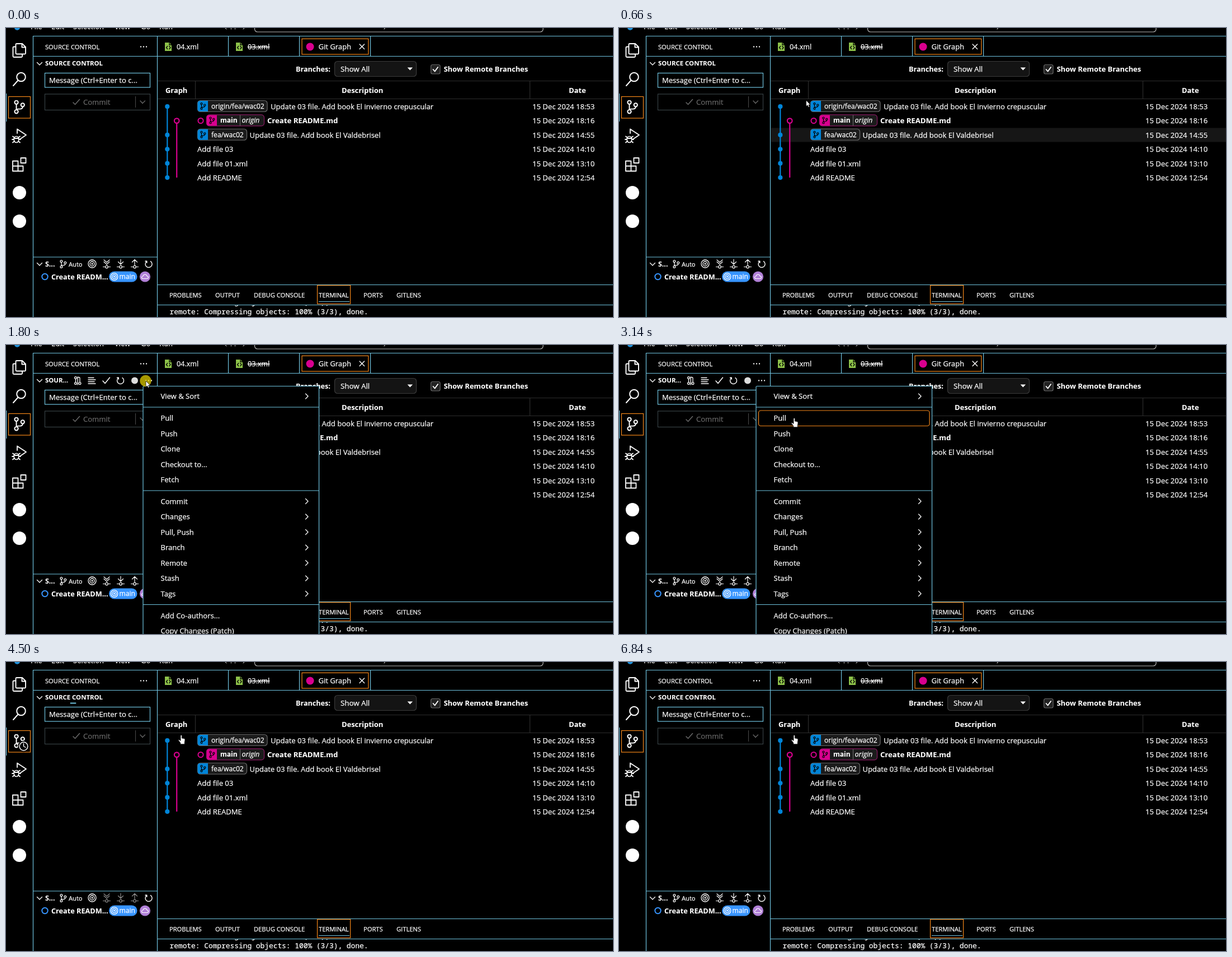
These frames come from a looping animation (1085x516 px, 8000 ms). An HTML page:

```html
<!DOCTYPE html>
<html lang="en">
<head>
<meta charset="utf-8">
<title>Pull from the source control menu</title>
<style>
html, body { margin: 0; width: 100%; height: 100%; overflow: hidden; background: #000; }
svg { display: block; font: 13.05px "Open Sans", "Noto Sans", sans-serif; }
text { fill: #fff; stroke: #fff; stroke-width: .25; white-space: pre; }
.b { font-weight: 700; font-size: 12.9px; }
.s { font-size: 11.15px; }
.h { font-weight: 700; font-size: 11.4px; }
.r { font-size: 12.1px; }
.m { font: 500 12.86px "Noto Sans Mono", "DejaVu Sans Mono", monospace; }
.b, .h { stroke-width: .1; }
.i { fill: none; stroke: #fff; stroke-linecap: round; stroke-linejoin: round; }
</style>
</head>
<body>
<svg id="stage" width="1085" height="516" viewBox="0 0 1085 516"></svg>
<script>
const CYAN = '#6fc3df', ORANGE = '#f38518', BLUE = '#0085d9', PINK = '#d9008f';
const PERIOD = 8000, TICK = 67.9;

const text = (x, y, s, cls = '', more = '') => `<text x="${x}" y="${y}" class="${cls}" ${more}>${s}</text>`;
const path = (d, w = 1.3, more = '') => `<path class="i" d="${d}" stroke-width="${w}" ${more}/>`;
const line = (d, c = CYAN, w = 1.2) => `<path d="${d}" fill="none" stroke="${c}" stroke-width="${w}"/>`;
const rect = (x, y, w, h, c = CYAN, fill = 'none', r = 0, more = '') =>
  `<rect x="${x}" y="${y}" width="${w}" height="${h}" rx="${r}" fill="${fill}" stroke="${c}" stroke-width="1.2" ${more}/>`;
const disc = (x, y, r, c) => `<circle cx="${x}" cy="${y}" r="${r}" fill="${c}"/>`;
const ring = (x, y, r, c = '#fff', w = 1.3, fill = 'none') =>
  `<circle cx="${x}" cy="${y}" r="${r}" fill="${fill}" stroke="${c}" stroke-width="${w}"/>`;
const group = (id, s, more = '') => `<g id="${id}" ${more}>${s}</g>`;
const at = (x, y, s, k = 1) => `<g transform="translate(${x} ${y}) scale(${k})">${s}</g>`;

const branch = (x, y, k = 1, c = '#fff', w = 1.3) => at(x, y,
  ring(-3, -5, 1.9, c, w) + ring(-3, 5, 1.9, c, w) + ring(3.8, -2.2, 1.9, c, w) +
  `<path d="M-3-3V3M3.8-.3Q3.8 2.2 1 2.2H-1Q-3 2.2-3 3.6" fill="none" stroke="${c}" stroke-width="${w}"/>`, k);
const dots = (x, y) => [-5, 0, 5].map(d => disc(x + d, y, 1.15, '#fff')).join('');
const target = (x, y, k = 1) => ring(x, y, 7 * k) + ring(x, y, 4 * k) + disc(x, y, 1.6 * k, '#fff');
const refresh = (x, y) => at(x, y, path('M-3.8-4.6A6 6 0 1 0 3.5-4.9M-6-5.2H-3.2V-2.2', 1.4));
// a commit on a line, below an arrow
const commitArrow = (x, d) => at(x, 421, path('M-6.5 5.5H-2.4M2.4 5.5H6.5' + d, 1.2) + ring(0, 5.5, 2.3, '#fff', 1.2));

function chrome() {
  const menuBar = [['File', 44], ['Edit', 81], ['Selection', 120], ['View', 194], ['Go', 241], ['Run', 274]];
  return disc(20, -1, 5, '#1f8fd8') + menuBar.map(([s, x]) => text(x, 1.5, s)).join('') +
    path('M392 0L394 2M426 0L424 2M402 1.5h1M409 1.5h1', 1) +
    rect(444.5, -20, 515.5, 27, '#b8b8b8', 'none', 5) + path('M676 2L678-1', 1) +
    line('M48 14.5H1085M48.5 14V516M270.5 14V516M49 50.5H1085M397.5 14V51M524.5 14V51M651.5 14V51') +
    line('M49 409H270M271 458.5H1085M271 494.5H1085');
}

function activityBar() {
  const files = 'M19 28H29L35 34V45Q35 46.5 33.5 46.5H19Q17.5 46.5 17.5 45V29.5Q17.5 28 19 28ZM28.5 28V34.5H35' +
    'M17 33.5H14Q12.5 33.5 12.5 35V50.5Q12.5 52 14 52H27.5Q29 52 29 50.5V47';
  const bug = 'M20 188V180.5L36 191L25 198.5M12 193.5L15 195.5M25 193.5L22 195.5M11 199H14M26 199H23' +
    'M12 204.5L15 202M25 204.5L22 202M14.3 197H22.7';
  return path(files, 1.9) + ring(27, 87.5, 7.8, '#fff', 2) + path('M21.5 93.5L13 103', 2) +
    rect(4.5, 122.5, 39, 38.5, ORANGE) + line('M.5 117V167') + branch(23.5, 141, 1.65, '#fff', 1.2) +
    path(bug, 1.8) + `<ellipse cx="18.5" cy="199" rx="4.3" ry="5.5" fill="none" stroke="#fff" stroke-width="1.7"/>` +
    path('M12 237.5H21.5V246.5H30.5V255.5H12ZM12 246.5H21.5V255.5M26.5 232H35.5V241H26.5Z', 1.8) +
    disc(24, 294, 12, '#fff') + disc(24, 345, 12, '#fff');
}

function sideBar() {
  const plain = text(70, 67.3, 'SOURCE CONTROL', 'h');
  const tools = text(70, 67.3, 'SOUR...', 'h') +
    ring(124.5, 58.5, 1.9) + ring(124.5, 68.5, 1.9) + ring(132, 68.5, 1.9) +
    path('M124.5 60.5V66.5M132 66.5V59Q132 57.5 129 57.5M128.2 57V71') +
    path('M147 58.5H157M147 62H160M147 65.5H158M147 69H160') +
    path('M173 64L177 68.5L185.5 58', 1.5) + refresh(204.5, 63.5) + disc(230, 63.5, 6, '#ddd') + dots(255, 63.5);
  const commit = rect(69.5, 118, 188, 28.5, '#8aa3ad', 'none') + line('M231.5 122V142', '#aaa') +
    path('M120 133L123.5 136.5L131.5 127.5', 1.6) + text(138, 137, 'Commit') + path('M240 130L244 134.5L248.5 130', 1.3);
  const sync = commitArrow(180, 'M-5-7L0-2.5L5-7M-5-3.5L0 1L5-3.5') +
    commitArrow(205, 'M0-8V1M-4.5-3.5L0 1L4.5-3.5') + commitArrow(230, 'M0 2V-7.5M-4.5-3L0-7.5L4.5-3');
  return text(70, 37.8, 'SOURCE CONTROL', 's') + dots(246, 33.5) +
    path('M55.5 61.5L60 66L64.5 61.5') + group('plain', plain) + group('tools', tools) +
    rect(69.5, 80.5, 188, 25.5) + text(77, 98.3, 'Message (Ctrl+Enter to c...') + `<g opacity=".4">${commit}</g>` +
    path('M55.5 419.5L60 424L64.5 419.5') + text(70, 425.7, 'S...', 'h', 'style="font-size:12.4px"') +
    branch(102, 421.5) + text(112, 425.7, 'Auto', 's') + target(154, 421) + group('sync', sync) + refresh(255, 421.5) +
    ring(69.5, 444, 5.2, '#3794ff', 2) + text(81, 448.7, 'Create READM...', 'b', 'style="font-size:12.7px"') +
    rect(184, 434.5, 50.5, 19, 'none', '#3794ff', 9.5) + target(193.5, 444, .9) + text(202.5, 448.3, 'main', 'r') +
    disc(248.5, 444, 9.6, '#b180d7') +
    path('M244.5 447.5Q242.3 447 242.5 445Q242.8 443 245 443Q245.5 440 248.5 440Q251.5 440 252 443Q254.5 443 254.5 445.3Q254.3 447.5 252 447.5Z', 1.2) +
    group('bar', rect(0, 72.5, 10.5, 2, 'none', CYAN)) +
    group('clock', disc(31.5, 150.5, 10, '#000') + ring(31.5, 150.5, 7.4, '#fff', 1.5) + path('M31.5 145.5V150.5L35 152.5', 1.4));
}

function tabs() {
  const file = x => at(x, 33.5,
    '<path d="M-6-7.5H2L6-3.5V7.5H-6Z" fill="#8dc149"/><path d="M-1-1.5L-3.5 1.5L-1 4.5M1.5-1.5L4 1.5L1.5 4.5M2-7V-3.5H6" fill="none" stroke="#000" stroke-width="1.3"/>');
  return file(290) + text(305, 38.3, '04.xml', '', 'font-size="12.6"') +
    file(417) + text(432, 38.3, '03.xml', '', 'font-size="12.6" text-decoration="line-through"') +
    rect(529, 19.3, 118.7, 27.7, ORANGE) + disc(543.5, 33.5, 7, PINK) + text(558.5, 38.3, 'Git Graph') +
    path('M632 29L640.5 37.5M640.5 29L632 37.5', 1.4);
}

function graph() {
  const rowY = i => 140.2 + i * 25.38;
  const rows = [
    [473, 'Update 03 file. Add book El invierno crepuscular', '18:53'],
    [467, 'Create README.md', '18:16'],
    [435.5, 'Update 03 file. Add book El Valdebrisel', '14:55'],
    [342, 'Add file 03', '14:10'],
    [342, 'Add file 01.xml', '13:10'],
    [342, 'Add README', '12:54']
  ];
  const label = (x, y, w, c, edge = '#6a6a6a') => rect(x + .5, y - 10, w, 20, edge, '#1b1b1b', 5) +
    `<path d="M${x + 19} ${y - 9.5}H${x + 5}Q${x + .5} ${y - 9.5} ${x + .5} ${y - 5}V${y + 5}Q${x + .5} ${y + 9.5} ${x + 5} ${y + 9.5}H${x + 19}Z" fill="${c}"/>` +
    branch(x + 10, y, .85, '#000', 1.4);
  let s = text(518, 78, 'Branches:', 'b', 'style="font-size:12.6px"') + rect(587.5, 59.5, 146, 27, '#3a3a3a', '#141414', 5) +
    text(598, 78, 'Show All', '', 'font-size="13.3"') + '<path d="M717.5 70.5H727L722.2 75.5Z" fill="#fff"/>' +
    rect(759.5, 65.5, 16.5, 16.5, '#666', '#222', 3) + path('M763.5 74L766.5 77.5L772 70', 1.9) +
    text(782.5, 78, 'Show Remote Branches', 'b') +
    line('M271 94.5H1085M271 126.5H1085M338.5 95V126M936.5 95V126', '#2c2c2c') +
    text(285, 115.5, 'Graph', 'b') + text(600, 115.5, 'Description', 'b') + text(1006, 115.5, 'Date', 'b') +
    group('hover', rect(271, rowY(2) - 12.5, 814, 25, 'none', '#161616'));
  s += line(`M288.3 ${rowY(0)}V${rowY(5)}`, BLUE, 2.2) + line(`M305.2 ${rowY(1)}V${rowY(5)}`, PINK, 2.2);
  rows.forEach(([x, msg, time], i) => {
    const y = rowY(i);
    s += i === 1 ? ring(305.2, y, 4.3, PINK, 2.2, '#000') : disc(288.3, y, 4.1, BLUE);
    s += text(x, y + 4.8, msg, i === 1 ? 'b' : '', i === 1 ? 'style="font-size:13.15px"' : '') +
      text(941, y + 4.8, '15 Dec 2024 ' + time);
  });
  return s + label(342, rowY(0) - .7, 124.5, BLUE) + text(367, rowY(0) + 3.8, 'origin/fea/wac02', 'r') +
    ring(348, rowY(1), 4.6, PINK, 2) + label(358, rowY(1) - .7, 103, PINK, '#8a1a63') +
    text(383, rowY(1) + 3.8, 'main', 'b', 'style="font-size:12px"') + line('M418.5 155.5V174.5', '#666') +
    text(421.5, rowY(1) + 3.8, 'origin', 'r', 'font-style="italic" style="font-size:12.5px"') +
    label(342, rowY(2) - .7, 88, BLUE) + text(367, rowY(2) + 3.8, 'fea/wac02', 'r');
}

function panel() {
  const names = [['PROBLEMS', 292], ['OUTPUT', 374], ['DEBUG CONSOLE', 443], ['TERMINAL', 559], ['PORTS', 639], ['GITLENS', 698]];
  return names.map(([s, x]) => text(x, 480.7, s, 's')).join('') + rect(556.5, 459.5, 59, 33, ORANGE) +
    line('M559 488.5H614') + '<clipPath id="term"><path d="M272 495H1085V516H272Z"/></clipPath>' +
    `<g clip-path="url(#term)">${text(292.5, 494, 'remote: Counting objects: 100% (5/5), done.', 'm')}${
      text(292.5, 511.3, 'remote: Compressing objects: 100% (3/3), done.', 'm')}</g>`;
}

function menu() {
  // each block: top item centre, item names, whether they open a submenu
  const blocks = [
    [91.5, ['View &amp; Sort'], true],
    [130.5, ['Pull', 'Push', 'Clone', 'Checkout to...', 'Fetch'], false],
    [279, ['Commit', 'Changes', 'Pull, Push', 'Branch', 'Remote', 'Stash', 'Tags'], true],
    [483, ['Add Co-authors...', 'Copy Changes (Patch)'], false]
  ];
  let s = rect(245, 73.5, 314.5, 460, CYAN, '#000', 2) + line('M245 111H559M245 260H559M245 463.5H559');
  for (const [top, names, sub] of blocks) names.forEach((name, i) => {
    const y = top + i * 27.5;
    s += text(276.5, y + 4.7, name) + (sub ? path(`M535.5 ${y - 4.5}L540 ${y}L535.5 ${y + 4.5}`) : '');
  });
  const focus = (id, y) => group(id, rect(249.5, y - 13.5, 305.5, 27.5, ORANGE, 'none', 4));
  return s + focus('onSort', 91.5) + focus('onPull', 130.5);
}

const hot = (id, x) => group(id, rect(x - 10, 53.5, 20, 20, ORANGE, 'none', 4, 'stroke-dasharray="2 2"'));
const arrow = '<path d="M0 0V11L2.5 8.7L4.2 12.4L6 11.6L4.4 8H7.6Z" fill="#fff" stroke="#000" stroke-width=".7"/>';
const hand = '<path d="M-1 .5Q.2-.6 1.4.5V5.5L5.5 6.3Q7.2 6.7 7 8.5L6.2 13.5V16.2H-1.2V14L-4.6 9.6Q-5 8.3-3.8 8L-1 10Z" fill="#fff" stroke="#000" stroke-width=".7"/>';

document.getElementById('stage').innerHTML =
  '<rect width="1085" height="516"/>' + chrome() + activityBar() + sideBar() + tabs() + graph() + panel() +
  hot('hotGraph', 230.5) + hot('hotMore', 255.5) + group('menu', menu()) +
  group('halo', disc(0, 0, 10.3, '#e6d200'), 'opacity=".72"') + group('arrow', arrow) + group('hand', hand);

const el = id => document.getElementById(id);
// when each part is visible, in ms
const spans = {
  tools: [[870, 3275]],
  plain: [[0, 870], [3275, PERIOD]],
  hover: [[590, 730]],
  hotGraph: [[1060, 1280]],
  hotMore: [[1410, 1790]],
  menu: [[1790, 3275]],
  onSort: [[2460, 2590]],
  onPull: [[2590, 3275]],
  halo: [[1730, 1860], [3205, 3410]],
  bar: [[3275, 6765]],
  clock: [[3410, 6765]]
};
// pointer steps: time, x, y, shape
const moves = [
  [450, 556, 470, 'arrow'], [520, 557, 312, 'arrow'], [590, 425, 190, 'arrow'], [660, 334.5, 129, 'arrow'],
  [730, 299, 100, 'arrow'], [800, 274, 83, 'arrow'], [870, 257, 73, 'arrow'], [930, 247, 67, 'arrow'],
  [1000, 240, 63, 'arrow'], [1060, 236, 61, 'hand'], [1130, 235, 60, 'hand'], [1200, 236, 59.5, 'hand'],
  [1280, 241, 59, 'hand'], [1340, 243.5, 59, 'hand'], [1410, 247, 61, 'hand'], [1470, 249, 63, 'hand'],
  [1530, 250, 64, 'hand'], [1795, 250, 64, 'arrow'], [2390, 254, 69, 'arrow'], [2460, 265, 82, 'hand'],
  [2530, 282, 99, 'hand'], [2590, 296, 114, 'hand'], [2660, 304, 120, 'hand'], [2730, 307, 121, 'hand'],
  [2990, 309, 124, 'hand'], [3140, 313, 130.5, 'hand']
];

const show = (id, on) => { el(id).style.visibility = on ? 'inherit' : 'hidden'; };
const move = (id, x, y) => el(id).setAttribute('transform', `translate(${x} ${y})`);

function draw(t) {
  for (const id in spans) show(id, spans[id].some(([a, b]) => t >= a && t < b));
  const p = moves.filter(m => t >= m[0]).pop();
  for (const id of ['arrow', 'hand']) {
    show(id, p && p[3] === id);
    if (p) move(id, p[1], p[2]);
  }
  if (p) move('halo', p[1] - .5, p[2]);
  const step = 3140 + Math.floor((t - 3140 + 2) / TICK) * TICK;
  move('bar', 126 + (step - 4710) * .0531, 0);
  el('sync').setAttribute('opacity', t >= 3410 && t < 6765 ? .55 : 1);
}

const start = performance.now();
function frame(now) {
  draw(Math.max(0, now - start) % PERIOD);
  requestAnimationFrame(frame);
}
draw(0);
requestAnimationFrame(frame);
</script>
</body>
</html>
```
